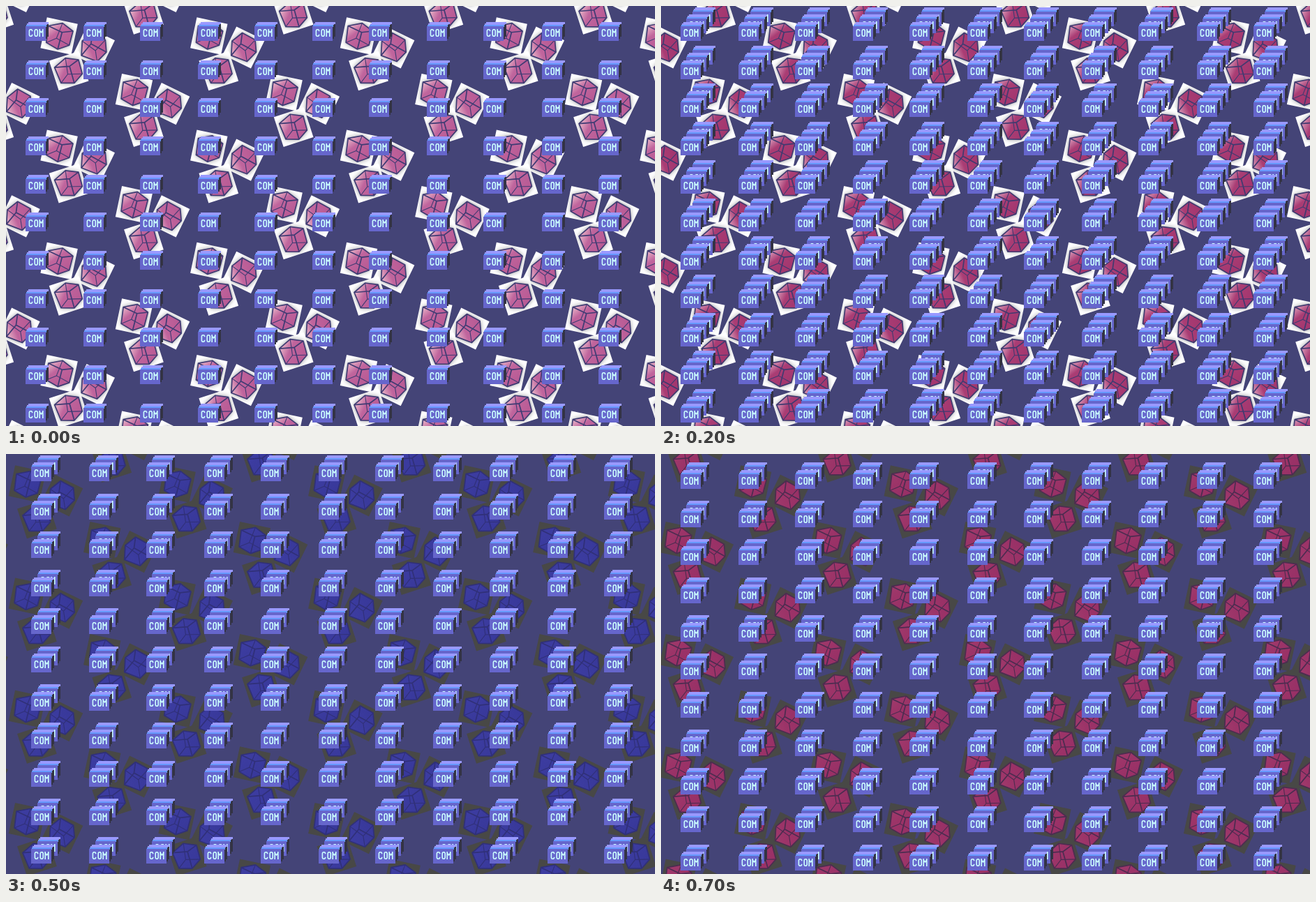
An HTML page with a canvas for the animation above (800 ms loop, 930 px wide and 602 px high).

```html
<!DOCTYPE html>
<html lang="en">
<head>
<meta charset="utf-8">
<title>COM cubes</title>
<style>
html, body { margin: 0; width: 100%; height: 100%; overflow: hidden; background: #444477; }
canvas { display: block; }
</style>
</head>
<body>
<canvas id="stage" width="930" height="602"></canvas>
<script>
const ctx = document.getElementById('stage').getContext('2d');
const W = 930, H = 602, STEP = 100, PX = W / 340;

// Five poses, played forwards and back
const poses = [
  { shift: 0,     paper: '#fff',    light: '#ecbccb', mid: '#c0659d', dark: '#b85a94', edge: '#3f3b73' },
  { shift: 55.4,  paper: '#484846', light: '#a03a6c', mid: '#9c3468', dark: '#983066', edge: '#4c2c50' },
  { shift: 96,    paper: '#fff',    light: '#dca0bd', mid: '#aa3d74', dark: '#a2366e', edge: '#403a70' },
  { shift: 169,   paper: '#484846', light: '#3d3da2', mid: '#3b3b9e', dark: '#38389a', edge: '#303078' },
  { shift: 208.5, paper: '#fff',    light: '#dca0bd', mid: '#aa3d74', dark: '#a2366e', edge: '#403a70' }
];

// Paper offset in a group, its tilt and the turn of the cube on it
const papers = [
  { x: 0,    y: 0,    tilt: 12,  turn: 0 },
  { x: 49.8, y: 16.5, tilt: 26,  turn: -90 },
  { x: 14,   y: 50,   tilt: -18, turn: 0 }
];

const outline = new Path2D('M-18-11L1-19L18-11L17 10L2 19L-16 13Z');
const front = new Path2D('M-18-11L3-6L18-11M3-6L2 19');
const back = new Path2D('M1-19L-3 4L17 10M-3 4L-16 13');
const letters = new Path2D(
  'M9.6 13.2V12.2L8.6 10.8H6.4L5.4 12.2V18.8L6.4 20.2H8.6L9.6 18.8V17.8' +
  'M14.2 10.8H16.2L17.2 12.2V18.8L16.2 20.2H14.2L13.2 18.8V12.2Z' +
  'M20.2 21V10M24.8 21V10M20.2 12L22.5 15L24.8 12');

const rad = deg => deg * Math.PI / 180;

function rect(color, x, y, w, h) {
  ctx.fillStyle = color;
  ctx.fillRect(x, y, w, h);
}

function cube(pose) {
  const fill = ctx.createLinearGradient(-16, -14, 13, 12);
  fill.addColorStop(0, pose.light);
  fill.addColorStop(0.4, pose.mid);
  fill.addColorStop(1, pose.dark);
  ctx.fillStyle = fill;
  if (pose.paper === '#fff') {
    ctx.shadowColor = 'rgba(40,40,50,.6)';
    ctx.shadowBlur = 7;
  }
  ctx.fill(outline);
  ctx.shadowColor = 'transparent';
  ctx.strokeStyle = pose.edge;
  ctx.lineJoin = 'round';
  ctx.lineWidth = 1.1;
  ctx.stroke(back);
  ctx.lineWidth = 1.7;
  ctx.stroke(front);
  ctx.stroke(outline);
}

function group(x, y, pose) {
  for (const p of papers) {
    ctx.save();
    ctx.translate(x + p.x, y + p.y);
    ctx.rotate(rad(p.tilt));
    rect(pose.paper, -22.5, -22.5, 45, 45);
    ctx.rotate(rad(p.turn));
    cube(pose);
    ctx.restore();
  }
}

function box(x, y) {
  ctx.save();
  ctx.translate(Math.round(x), Math.round(y));
  rect('#333344', 28, 3, 5, 18);
  rect('#333344', 28, 20, 3, 4);
  rect('#9999ff', 4, 0, 29, 3);
  rect('#9999ff', 2, 2, 29, 2);
  rect('#6699ff', 1, 4, 29, 3);
  rect('#6666cc', 0, 6, 29, 21);
  ctx.strokeStyle = '#ccffff';
  ctx.lineJoin = 'miter';
  ctx.lineWidth = 1.6;
  ctx.stroke(letters);
  ctx.restore();
}

function draw(i) {
  rect('#444477', 0, 0, W, H);
  for (let row = -2; row < 8; row++)
    for (let col = -3; col < 5; col++)
      group(76.1 + poses[i].shift + 214.7 * col + (row & 1) * 107.35, 43 + 80.6 * row, poses[i]);

  // Boxes pile up towards the top right, then drop off from the front
  for (let k = Math.min(2, i); k >= Math.max(0, i - 2); k--)
    for (let row = 0; row < 11; row++)
      for (let col = 0; col < 11; col++)
        box(28 + 30 * PX * col + col % 2 + 8.4 * k, 22.9 + 20 * PX * row - 10.45 * k);
}

let shown = -1;
function tick(now) {
  const n = Math.floor(now / STEP) % 8;
  const i = n < 5 ? n : 8 - n;
  if (i !== shown) draw(shown = i);
  requestAnimationFrame(tick);
}
draw(shown = 0);
requestAnimationFrame(tick);
</script>
</body>
</html>
```
